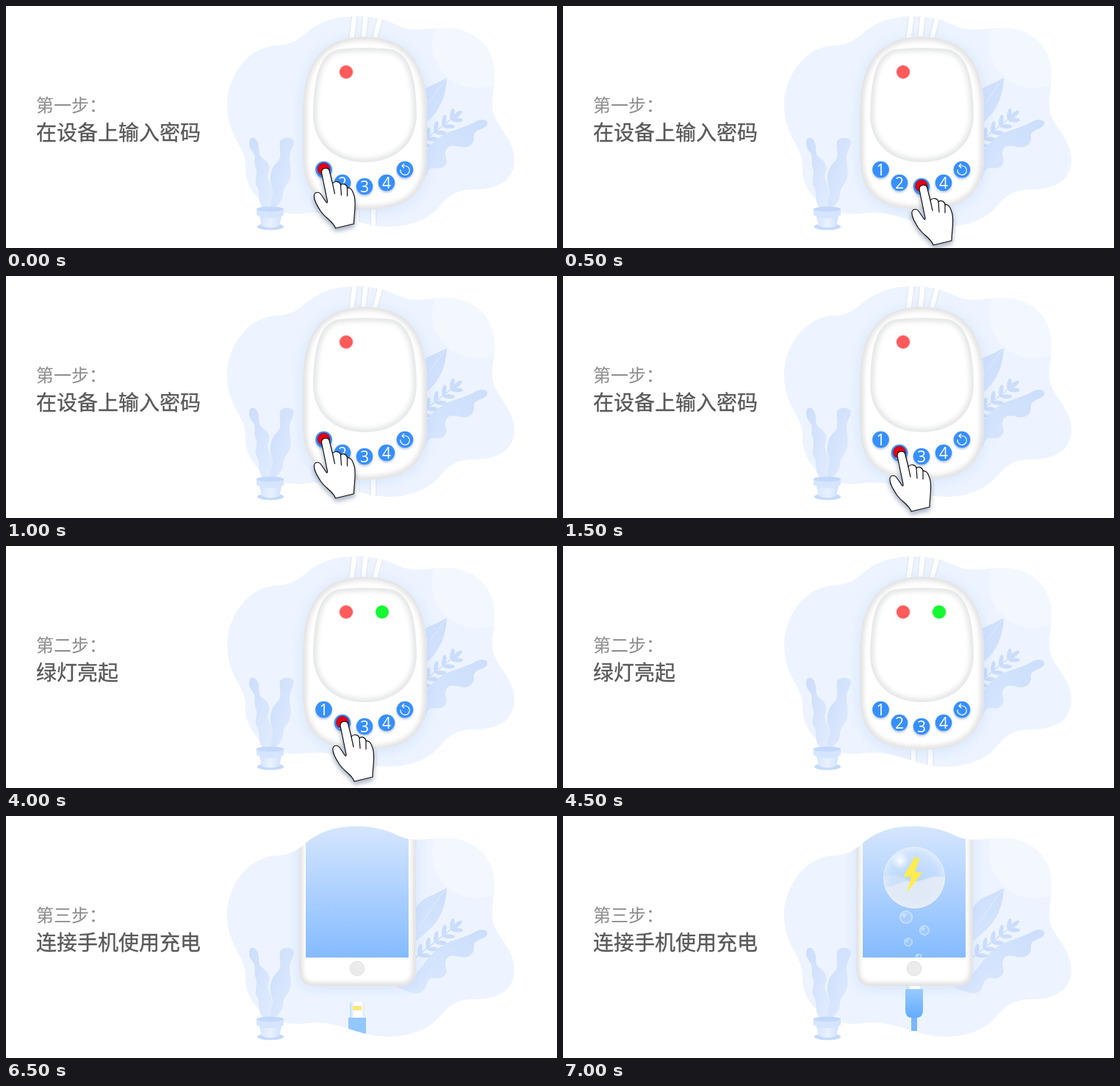
An HTML page that plays this animation: 750x330 px, repeating every 7.7 s.

```html
<!DOCTYPE html>
<html lang="zh-CN">
<head>
<meta charset="utf-8">
<title>使用步骤</title>
<style>
html, body { margin: 0; width: 100%; height: 100%; overflow: hidden; background: #fff; }
svg { display: block; width: 750px; height: 330px; }
text { font-family: "Noto Sans CJK SC", "Noto Sans CJK", "Noto Sans", sans-serif; }
.digit { font: 21px "Open Sans", "Noto Sans", sans-serif; fill: #fff; text-anchor: middle; }
.soft { filter: drop-shadow(0 3px 9px rgba(140, 182, 255, .26)); }
.lift { filter: drop-shadow(0 2px 1.5px rgba(40, 90, 170, .35)); }
</style>
</head>
<body>
<svg viewBox="0 0 750 330">
  <defs>
    <path id="blob" d="M301 134C301 99 327 56 368 54C402 52 404 34 430 23C462 9 505 13 530 25C556 38 572 30 592 30C632 28 662 50 665 90C666 115 658 130 664 148C671 168 692 183 692 210C692 238 668 250 640 250C610 249 600 262 588 276C565 300 525 306 490 297C455 288 440 278 405 283C365 288 325 260 326 220C327 190 301 180 301 134Z"/>
    <path id="body" d="M404 142C404 84 425 42 488 42C551 42 573 84 573 142V206C573 258 544 278 488 278C432 278 404 258 404 206Z"/>
    <path id="panel" d="M418 148C419 96 426 66 452 59Q488 55 525 59C550 66 558 96 559 148C559 188 530 213 488 213C447 213 418 188 418 148Z"/>
    <path id="case" d="M399 0H558V210Q558 232 536 232H421Q399 232 399 210Z"/>
    <clipPath id="inBlob"><use href="#blob"/></clipPath>
    <clipPath id="inBody"><use href="#body"/></clipPath>
    <clipPath id="inPanel"><use href="#panel"/></clipPath>
    <clipPath id="inCase"><use href="#case"/></clipPath>
    <clipPath id="inScreen"><path d="M408 0H548V193H408Z"/></clipPath>
    <clipPath id="inBubble"><circle cx="478" cy="84" r="42"/></clipPath>
    <filter id="blur"><feGaussianBlur stdDeviation="3"/></filter>
    <linearGradient id="leaf" x1="0" y1="0" x2="1" y2="1">
      <stop stop-color="#cbddfb"/><stop offset="1" stop-color="#e2ecfe"/>
    </linearGradient>
    <linearGradient id="leafBack" x1="1" y1="0" x2="0" y2="1">
      <stop stop-color="#cbdefc"/><stop offset="1" stop-color="#dde9fe"/>
    </linearGradient>
    <linearGradient id="pot"><stop stop-color="#d3e3fd"/><stop offset=".5" stop-color="#e9f1ff"/><stop offset="1" stop-color="#cfe1fd"/></linearGradient>
    <linearGradient id="glass" gradientUnits="userSpaceOnUse" x1="0" y1="18" x2="0" y2="193">
      <stop stop-color="#d4e5fe"/><stop offset="1" stop-color="#84bbff"/>
    </linearGradient>
    <linearGradient id="plugBlue" x1="0" y1="0" x2="0" y2="1">
      <stop stop-color="#98cbff"/><stop offset="1" stop-color="#62abfd"/>
    </linearGradient>
    <linearGradient id="metal"><stop stop-color="#b9dbff"/><stop offset=".3" stop-color="#fff"/><stop offset=".8" stop-color="#fff"/><stop offset="1" stop-color="#d5e8ff"/></linearGradient>
    <radialGradient id="ball">
      <stop stop-color="#fff" stop-opacity=".04"/><stop offset=".75" stop-color="#fff" stop-opacity=".16"/><stop offset="1" stop-color="#fff" stop-opacity=".42"/>
    </radialGradient>
    <radialGradient id="shine"><stop stop-color="#fff" stop-opacity=".95"/><stop offset="1" stop-color="#fff" stop-opacity="0"/></radialGradient>
  </defs>

  <use href="#blob" fill="#edf4ff"/>
  <circle cx="641" cy="51" r="61" fill="#f3f8ff" clip-path="url(#inBlob)"/>

  <!-- leaves on the right -->
  <path d="M600 98C599 120 592 142 574 157L545 182C546 150 552 122 573 111Q588 105 600 98Z" fill="url(#leafBack)"/>
  <path d="M600 98Q575 130 550 172" fill="none" stroke="#e3edfe"/>
  <g id="fern" fill="#cbddfb"><path d="M545 203Q578 176 614 148" fill="none" stroke="#cbddfb" stroke-width="1.5"/></g>
  <path d="M532 233C562 222 566 199 584 184C602 168 622 168 640 157C652 152 658 158 654 163C648 170 636 168 637 179C637 192 626 195 614 191C600 188 596 197 599 207C602 218 593 223 583 221C572 220 574 230 569 237C562 247 548 240 532 233Z" fill="url(#leafBack)"/>

  <!-- potted plant -->
  <ellipse cx="360" cy="301" rx="18" ry="4.5" fill="#c3d9fb"/>
  <path d="M332 182C335 177 341 180 343 187C346 195 342 202 349 207C357 212 361 219 357 229C354 239 364 244 362 256V278H352C340 266 347 256 342 247C336 239 344 230 340 221C336 211 342 205 335 198C331 193 330 187 332 182Z" fill="url(#leaf)"/>
  <path d="M373 184C378 177 392 179 392 186C391 194 386 198 386 207C386 217 389 224 387 233C385 244 377 246 377 257C376 268 369 273 361 278C358 267 365 258 362 247C357 234 361 220 369 213C377 206 371 195 373 184Z" fill="url(#leaf)"/>
  <path d="M344 282H376L372 300Q360 305 348 300Z" fill="url(#pot)"/>
  <path d="M341 277V285Q359 294 378 285V277Z" fill="#d5e5fd"/>
  <ellipse cx="359.5" cy="277" rx="18.5" ry="3.5" fill="#c3d8fa"/>

  <text id="title" x="41" y="143.5" font-size="24" fill="#8c8c8c"></text>
  <text id="line" x="41" y="183" font-size="28" fill="#595959" stroke="#595959" stroke-width=".35"></text>

  <g id="device">
    <g clip-path="url(#inBlob)">
      <g id="cables" fill="none"></g>
      <use href="#body" fill="#fff" class="soft"/>
    </g>
    <g clip-path="url(#inBody)"><use href="#body" fill="none" stroke="#e1e1e1" stroke-width="10" filter="url(#blur)"/></g>
    <use href="#panel" fill="#fff"/>
    <g clip-path="url(#inPanel)"><use href="#panel" fill="none" stroke="#e4e6e7" stroke-width="10" filter="url(#blur)"/></g>
    <circle cx="463" cy="90" r="9" fill="#ff5a5c" style="filter:drop-shadow(0 0 1.5px #ff5a5c66)"/>
    <circle id="green" cx="512" cy="90" r="9" fill="#14f932"/>
    <g id="keys" class="lift"></g>
    <g id="hand">
      <circle r="8.5" cy="-.5" fill="#e60012" stroke="#5b2050" stroke-opacity=".7"/>
      <g transform="translate(1 1)" style="filter:drop-shadow(0 4px 3px rgba(50,75,115,.45))" fill="#fff" stroke="#111" stroke-width="1.2" stroke-linejoin="round" stroke-linecap="round">
        <path d="M-4 3C-4-4 6-5 7 2L11 18C14 14 21 15 22 20C26 17 31 20 31 24C37 23 39 30 41 37C43 50 40 61 40 73L15 79C12 70 2 66-5 56C-10 48-15 40-14 34C-13 29-7 29-4 34L2 43Q4 46 4 42Z"/>
        <path d="M11 18L14 32M22 20L23 34M31 24L31 35" fill="none"/>
      </g>
    </g>
  </g>

  <g id="phone" clip-path="url(#inBlob)">
    <use href="#case" fill="#fff" class="soft"/>
    <g clip-path="url(#inCase)"><use href="#case" fill="none" stroke="#dedede" stroke-width="9" filter="url(#blur)"/></g>
    <path d="M408 0H548V193H408Z" fill="url(#glass)"/>
    <circle cx="478" cy="208" r="10" fill="#ebebeb" stroke="#e3e3e3"/>
    <g id="unplugged">
      <path d="M468 276V258Q468 253 473 253H483Q488 253 488 258V276Z" fill="url(#metal)"/>
      <path d="M472 259H484V265H472Z" fill="#ffe57c"/>
      <path d="M466 275H490V310H466Z" fill="#93c7ff"/>
    </g>
    <g id="charging">
      <path d="M468 232H488V237H468Z" fill="url(#metal)"/>
      <path d="M474 272H482V293H474Z" fill="#79b6fe"/>
      <path d="M466 236H490V265Q490 275 481 275H475Q466 275 466 265Z" fill="url(#plugBlue)"/>
      <g clip-path="url(#inBubble)">
        <circle cx="478" cy="84" r="42" fill="url(#ball)"/>
        <path d="M436 84C450 77 462 83 474 90C490 97 498 80 520 84V130H436Z" fill="#e9eef4" opacity=".35"/>
        <path d="M436 96C450 99 458 88 472 89C490 91 498 79 520 83V130H436Z" fill="#e9eef4" opacity=".75"/>
      </g>
      <circle cx="478" cy="84" r="41.5" fill="none" stroke="#fff" stroke-opacity=".35"/>
      <circle cx="459" cy="61" r="12" fill="url(#shine)"/>
      <path d="M479 56L463 83H474L468 105L489 77H479L485 58Z" fill="#ffec4d"/>
      <g id="drops" clip-path="url(#inScreen)"></g>
    </g>
  </g>
</svg>
<script>
const $ = id => document.getElementById(id);
const keys = [[432.5, 223], [458, 241], [488, 246], [518, 241], [543, 223]];
const lines = [
  ["第一步：", "在设备上输入密码"],
  ["第二步：", "绿灯亮起"],
  ["第三步：", "连接手机使用充电"]
];
// start in ms, step, pressed key (0 for none)
const states = [
  [0, 0, 1], [500, 0, 3], [1000, 0, 1], [1500, 0, 2], [2000, 0, 3],
  [4000, 1, 2], [4500, 1, 0], [6500, 2, 0], [7000, 2, 0]
];

const add = (id, markup) => $(id).innerHTML += markup;
const show = (id, on) => $(id).style.display = on ? "" : "none";

keys.forEach(([x, y], i) => {
  add("keys", `<circle cx="${x}" cy="${y}" r="11.3" fill="#378ffc"/>`);
  add("keys", i < 4
    ? `<text class="digit" x="${x}" y="${y + 7.5}">${i + 1}</text>`
    : `<g transform="translate(${x} ${y})" fill="none" stroke="#fff" stroke-width="1.2"><path d="M-6 0A6.2 6.2 0 1 0 1-5H-4M-1-8L-4-5L-1-2"/></g>`);
});

for (const d of ["M475 10L470 48", "M490 10L486 48", "M511 10L501 48", "M477 270V305", "M500 270V305"])
  add("cables", `<path d="${d}" stroke="#e8edf4" stroke-width="10"/><path d="${d}" stroke="#fff" stroke-width="6"/>`);

const leaflet = (x, y, turn) =>
  add("fern", `<ellipse cx="8" rx="8" ry="3" transform="translate(${x} ${y}) rotate(${turn})"/>`);
for (let i = 0; i < 5; i++)
  for (const turn of [-80, 2]) leaflet(562 + i * 11, 190 - i * 8.7, turn);
leaflet(608, 153, -38);

for (const [x, y, r] of [[467, 138, 8.5], [492, 156, 6.5], [470, 172, 5.5], [484, 192, 4]])
  add("drops", `<circle cx="${x}" cy="${y}" r="${r}" fill="url(#ball)" stroke="#fff" stroke-opacity=".45"/>
    <circle cx="${x - r * .3}" cy="${y - r * .3}" r="${r * .5}" fill="url(#shine)" opacity=".6"/>`);

let last;
function draw(now) {
  const t = now % 7700;
  const state = states.findLast(s => s[0] <= t);
  if (state === last) return;
  const [start, step, key] = last = state;
  [$("title").textContent, $("line").textContent] = lines[step];
  show("device", step < 2);
  show("phone", step === 2);
  show("green", step === 1);
  $("green").style.filter = start >= 4500 ? "drop-shadow(0 0 1.5px #14f93288)" : "";
  show("hand", key);
  if (key) $("hand").setAttribute("transform", `translate(${keys[key - 1]})`);
  show("unplugged", start === 6500);
  show("charging", start === 7000);
}

const begin = performance.now();
function tick() {
  draw(performance.now() - begin);
  requestAnimationFrame(tick);
}
tick();
</script>
</body>
</html>
```
